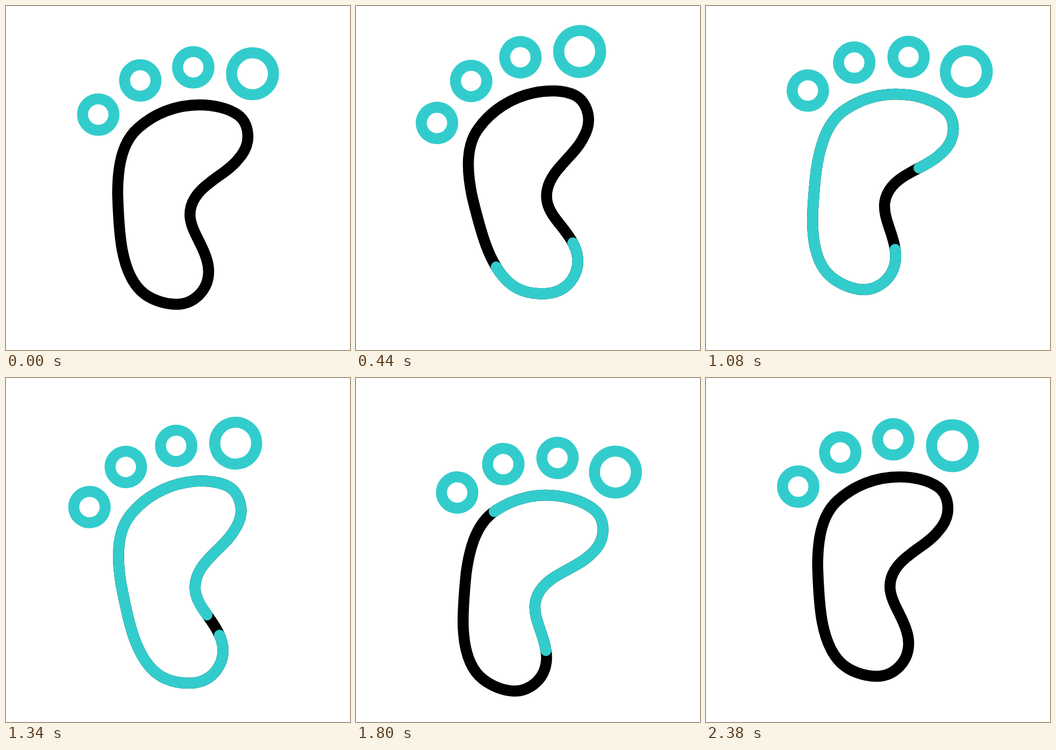
Write an HTML page that moves like this. It is 640 by 640 pixels and loops after 2.4 s.

```html
<!DOCTYPE html>
<html lang="en">
<head>
<meta charset="utf-8">
<title>Footprint</title>
<style>
  html, body { margin: 0; width: 100%; height: 100%; overflow: hidden; background: #fff; }
  svg { display: block; width: 100%; height: 100%; }
</style>
</head>
<body>
<svg viewBox="0 0 640 640" fill="none" stroke-width="20.5" stroke-linecap="round" stroke-linejoin="round">
  <g id="foot">
    <g stroke="#33cccc">
      <circle cx="171.6" cy="202" r="29.2"/>
      <circle cx="249.8" cy="138.5" r="29.2"/>
      <circle cx="348.4" cy="114" r="29.2"/>
      <circle cx="458.6" cy="126" r="39"/>
    </g>
    <path id="sole" stroke="#000" d="M373.5 472
      C375.8 479 377 486.5 377 494
      C377 528 350 555 317 555
      C295 555 267 546 250 529
      C211 490 210 410 207.7 350
      C207.7 295 217 252 246 227
      C276 200 316 184 360 184
      C386 184 414 190 432 203
      C444 212 450 227 450 243
      C450 258 443 273 432 285
      C418 303 396 315 380 328
      C358 344 342.3 364 342.3 388
      C342.3 416 366 443 373.5 472Z"/>
    <path id="trace" stroke="#33cccc" pathLength="1"/>
  </g>
</svg>
<script>
  const LOOP = 2400;
  const foot = document.getElementById('foot');
  const trace = document.getElementById('trace');
  trace.setAttribute('d', document.getElementById('sole').getAttribute('d'));

  // Keys are [time, value]
  const SWING = [[0, 0], [545, -13], [948, 12], [1467, -12.4], [1928, 12], [2380, 0]];
  const LIFT = [[0, 0], [915, -36.3], [1585, 35.8], [2380, 0]];

  const progress = (t, from, to) => Math.min(1, Math.max(0, (t - from) / (to - from)));
  const smooth = x => x * x * (3 - 2 * x);
  const soft = x => x - 0.48 * Math.sin(2 * Math.PI * x) / (2 * Math.PI);

  function track(keys, t) {
    for (let i = 1; i < keys.length; i++) {
      const [t0, v0] = keys[i - 1], [t1, v1] = keys[i];
      if (t < t1) return v0 + (v1 - v0) * smooth(progress(t, t0, t1));
    }
    return keys[keys.length - 1][1];
  }

  function draw(t) {
    foot.setAttribute('transform',
      `translate(0 ${track(LIFT, t)}) rotate(${track(SWING, t)} 320 320)`);
    const head = soft(progress(t, 0, 1450));
    const tail = smooth(progress(t, 1311, 2301));
    const len = head - tail;
    trace.style.display = len > 0.0005 ? '' : 'none';
    trace.setAttribute('stroke-dasharray', `${Math.max(0, len)} 2`);
    trace.setAttribute('stroke-dashoffset', -tail);
  }

  const start = performance.now();
  function tick() {
    draw((performance.now() - start) % LOOP);
    requestAnimationFrame(tick);
  }
  draw(0);
  requestAnimationFrame(tick);
</script>
</body>
</html>
```
